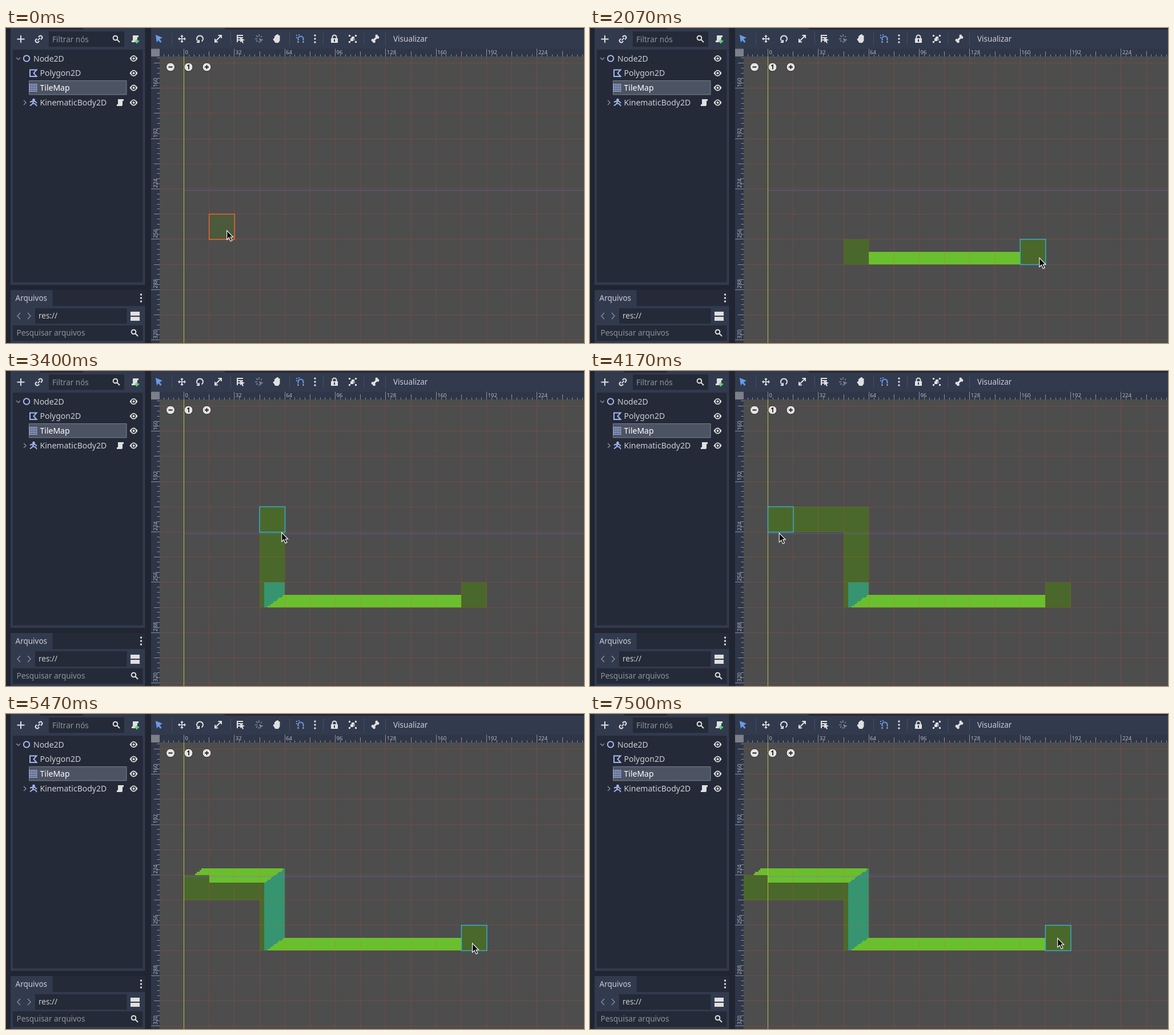
Animation, 1012 px wide and 553 px high, one loop 8 s. Source, as an HTML page:

```html
<!DOCTYPE html>
<html lang="pt">
<head>
<meta charset="utf-8">
<title>TileMap</title>
<style>
html, body { margin: 0; width: 100%; height: 100%; overflow: hidden; background: #202531; }
svg { display: block; width: 100%; height: 100%; }
text { font-family: "Noto Sans", sans-serif; font-size: 14px; fill: #cdcfd4; }
.small { font-size: 13.5px; }
.dim { fill: #8f949f; }
.rule { font-size: 9.5px; fill: #b4b8c0; }
.line { fill: none; stroke: #e0e0e0; stroke-width: 2; }
.node { fill: none; stroke: #a5b7f3; stroke-width: 2; }
.gray { fill: none; stroke: #858b98; stroke-width: 1.5; }
.snap { fill: none; stroke: #699ce8; stroke-width: 2; }
.field { fill: #242a37; }
.base { fill: #323a4e; }
.back { fill: #202531; }
.lit { fill: #e0e0e0; }
</style>
</head>
<body>
<svg viewBox="0 0 1012 553" xmlns="http://www.w3.org/2000/svg">
  <defs>
    <clipPath id="view"><path d="M269 50H1012V553H269Z"/></clipPath>
    <g id="eye">
      <path class="lit" d="M-7 0Q0-11 7 0Q0 11-7 0Z"/>
      <circle r="3.7" class="field"/><circle r="2" class="lit"/>
    </g>
    <g id="lens" class="line"><circle cx="-1.5" cy="-1.5" r="3.8"/><path d="M1.5 1.5L6 6"/></g>
    <path id="dots" class="line" d="M0-6v.1M0 0v.1M0 6v.1" stroke-linecap="round" style="stroke-width:3.4px"/>
    <path id="scroll" class="lit" d="M-4-6H6V-3H4V4Q4 6 2 6H-6V3H-4Z"/>
    <path id="arm" class="lit" d="M-1-2V-4H-3L0-7L3-4H1V-2Z"/>
    <g id="disc"><circle r="7.5" fill="#e4e4e4" stroke="#2a2a2a"/></g>
  </defs>

  <path fill="#4d4d4d" d="M269 50H1012V553H269Z"/>
  <g clip-path="url(#view)">
    <g id="tiles" shape-rendering="crispEdges"></g>
    <g id="grid" stroke="#ff4d1a" stroke-opacity=".2"></g>
    <path d="M311 285.5H1012" stroke="#66f" stroke-opacity=".45"/>
    <path d="M311.5 50V553" stroke="#b9bd40"/>
    <rect id="hover" fill-opacity=".5" stroke-opacity=".85" stroke-width="1.6"/>
  </g>

  <use href="#disc" x="288" y="68.5"/><use href="#disc" x="319.5" y="68.5"/><use href="#disc" x="351.5" y="68.5"/>
  <path d="M284.5 68.5h7M348 68.5h7M351.5 65v7M317.5 66.5L320 65v7.5" fill="none" stroke="#222" stroke-width="1.8"/>

  <!-- rulers -->
  <path fill="#2e3648" d="M254 36H1012V50H269V553H254Z"/>
  <path fill="#7c808a" d="M254 36h15v14h-15Z"/>
  <g id="ticks" stroke="#8d929d"></g>
  <g id="labels"></g>

  <!-- toolbar -->
  <path class="back" d="M0 0H254V553H0Z"/>
  <path class="base" d="M254 0H383V2.500H1012V36.500H254Z"/>
  <g id="separators" stroke="#454d61"></g>
  <path fill="#699ce8" d="M262 12l12 5l-5 2.500l3.500 4.500l-2.500 2l-3-4.500l-3 4Z"/>
  <g id="move" transform="translate(308 19)"><circle class="lit" r="1.7"/></g>
  <path class="line" d="M336.500 23.500a5.500 5.500 0 1 1 6 0M334 25h4v-4M339.500 19v.1"/>
  <path class="line" d="M367 23l9-9M366 19v5.500h5M371.500 13H377v5"/>
  <path class="line" d="M404 13h11M404 17h11M404 21h6M405 12v13"/>
  <path class="lit" d="M410 17l8 4l-3.500 1.500l1.500 4h-2l-1.500-3l-2.500 1.500Z"/>
  <path class="gray" d="M443 11v4M436 19h4M438 13l3 3M438 24l2.500-2.500M443 23v3M448 14l-2 2"/>
  <path fill="#858b98" d="M443 18l8 3l-4 1l-1 4Z"/>
  <path class="lit" d="M470 18v-4h2v-2h2.500v-1H477v2h2.500v9l-2.500 4h-5.500l-4-6q1-2.500 2.500-2Z"/>
  <path class="snap" d="M511.500 22v-3a4.500 4.500 0 0 1 9 0v3M508 13h2M508 17h2M512 12h2"/>
  <path class="line" d="M510.500 24.500h2M519.500 24.500h2"/>
  <use href="#dots" x="541" y="19"/>
  <path class="lit" d="M569 18h12v8h-12Z"/><path class="line" d="M571.500 19v-3a3.500 3.500 0 0 1 7 0v3"/>
  <path class="base" d="M574 20h2v4h-2Z"/>
  <path class="line" d="M600 13.500h14M600 24.500h14" stroke-dasharray="3 8" style="stroke-width:3px"/>
  <path class="lit" d="M605 15h5v3h-2v5h-5v-5h2Z"/><path fill="#9196a1" d="M608 18h3v4h-3Z"/>
  <path class="line" d="M643 22.500l7-7" style="stroke-width:3.5px"/>
  <path class="line" d="M642 21.500v.1M644.500 23.800v.1M648.800 14v.1M651 16.500v.1" stroke-linecap="round" style="stroke-width:4.8px"/>
  <text class="small" x="678" y="24">Visualizar</text>

  <!-- scene dock -->
  <path class="base" d="M8 0H60V2.500H135V0H243.500V451H8Z"/>
  <path class="line" d="M26 13v13M19.500 19.500h13"/>
  <path class="line" transform="translate(57.5 19.5) rotate(-45)" d="M-2-3h-2a3 3 0 0 0 0 6h2M2-3h2a3 3 0 0 1 0 6h-2M-3 0h6"/>
  <path class="field" d="M75 6h132v27h-132ZM12 38h227.500v408.500H12Z"/>
  <text class="small dim" x="81" y="24.5">Filtrar nós</text>
  <use href="#lens" x="193" y="19"/>
  <use href="#scroll" x="226" y="19"/>
  <path d="M229 19.500v7.500M225.500 23.300h7.500" stroke="#65d67c" stroke-width="2.5"/>
  <path d="M40.500 92.500h170.500v24.500h-170.500Z" fill="#4c5363" stroke="#7b818e"/>
  <path class="gray" d="M18 52l3.500 3.500l3.500-3.500M31 127l4 4l-4 4"/>
  <circle class="node" cx="36" cy="53.5" r="5.2"/>
  <path class="node" d="M53.500 73.500H42V85h11.500l-5-5.800Z"/>
  <g id="mesh" class="node" stroke-dasharray="2 1"></g>
  <circle cx="48.5" cy="126" r="2.3" fill="#a5b7f3"/>
  <path class="node" d="M42 130l4-1.500h4l4 3M48 129l-1.500 4l-4.500 3.500M47 132l4.500 1.500l2.500 3.500"/>
  <text x="48" y="58.5">Node2D</text>
  <text x="59.5" y="84">Polygon2D</text>
  <text x="59.5" y="110" style="fill:#fff">TileMap</text>
  <text x="59.5" y="135.5">KinematicBody2D</text>
  <use href="#scroll" x="200" y="131"/>
  <g id="eyes"></g>

  <!-- file dock -->
  <path class="field" d="M8 460h235.500v28H8Z"/>
  <path class="base" d="M8 460H81.500V488H243.500V553H8Z"/>
  <text class="small" x="16.5" y="479">Arquivos</text>
  <use href="#dots" x="236.5" y="474"/>
  <path class="gray" d="M25 500l-5 5.500l5 5.500M38 500l5 5.500l-5 5.500"/>
  <path class="field" d="M51 492h160.500v27H51ZM12 522h227.500v27H12Z"/>
  <text class="small" x="57" y="510">res://</text>
  <path class="lit" d="M218 498h16v7h-16ZM218 507h16v7h-16Z"/>
  <text class="small dim" x="18.5" y="540">Pesquisar arquivos</text>
  <use href="#lens" x="225" y="535"/>

  <path id="cursor" d="M.7.7V16.500L4.300 13L7.200 19.300L10 18L7.100 12H11.700Z" fill="#080808" stroke="#fff" stroke-width="1.1"/>
</svg>
<script>
const LOOP = 8000, CELL = 44.17, PX = CELL / 16;
const DARK = '#4a682b', BRIGHT = '#6abf2e', TEAL = '#369470';
const el = id => document.getElementById(id);
const X = c => 311.5 + c * CELL, Y = r => 282.5 + r * CELL;
const range = (from, to, make) => {
  let out = '';
  for (let i = from; i < to; i++) out += make(i);
  return out;
};

const poses = [{ t: 0, x: 386, y: 355, c: 1, r: 1 }];
const paintedAt = new Map();
let last = [386, 355, 1, 1];

function along(path, u) {
  const i = Math.max(1, path.findIndex(k => k[0] >= u));
  const a = path[i - 1], b = path[i];
  const p = (u - a[0]) / (b[0] - a[0]);
  return a.slice(1).map((v, n) => v + (b[n + 1] - v) * p);
}

// Keys are [progress, cursor x, cursor y, column, row]; a cell left out stays.
// Cells are painted up to the share given by paint.
function stroke(start, end, steps, paint, ...keys) {
  const path = [[0, ...last]];
  for (const [u, x, y, c = last[2], r = last[3]] of keys) {
    last = [x, y, c, r];
    path.push([u, ...last]);
  }
  for (let k = 1; k <= steps; k++) {
    const t = start + (end - start) * (k - 1) / Math.max(1, steps - 1);
    const [x, y, col, row] = along(path, k / steps);
    const c = Math.round(col), r = Math.round(row), id = c + ',' + r;
    poses.push({ t, x, y, c, r });
    if (k / steps <= paint && !paintedAt.has(id)) paintedAt.set(id, t);
  }
}

stroke(530, 1300, 12, 0, [.25, 376, 318, 1, 0], [.66, 424, 372, 3, 2], [1, 464, 402]);
stroke(1500, 1500, 1, 0, [1, 473, 398]);
stroke(1670, 2470, 17, 1, [.04, 473, 398], [.529, 786, 403, 10], [.64, 825, 401, 11], [.8, 820, 400], [1, 700, 395, 9]);
stroke(2500, 2870, 6, 0, [.5, 385, 390, 1], [1, 590, 392, 6]);
stroke(3070, 3200, 4, 1, [.5, 490, 385, 3], [.75, 478, 368, 3, 1], [1, 482, 350, 3, 0]);
stroke(3370, 3570, 4, 1, [.25, 482, 283, 3, -1], [1, 480, 264]);
stroke(3770, 4000, 6, 1, [.8, 345, 270, 0], [1, 332, 276]);
stroke(4170, 4670, 7, 1, [.4, 328, 298, 0, 0], [.6, 384, 303], [1, 328, 301]);
stroke(4830, 5570, 14, .3, [.14, 341, 300, 1], [.21, 375, 302, 2], [.3, 430, 303], [.8, 815, 400, 11, 2], [1, 818, 407]);
stroke(5970, 6270, 8, 0, [.5, 285, 301, -1, 0], [.62, 300, 299, 0], [1, 335, 302]);
stroke(6570, 6670, 3, 1, [.33, 300, 300, -1], [.66, 300, 290, -1, -1], [1, 298, 284]);
stroke(7000, 7500, 10, 0, [.8, 810, 392, 11, 2], [1, 818, 393]);

// Tile artwork is on a 16 by 16 pixel cell.
function tile(c, r, has) {
  const box = (x, y, w, h, color) =>
    `<rect x="${X(c) + x * PX}" y="${Y(r) + y * PX}" width="${w * PX}" height="${h * PX}" fill="${color}"/>`;
  const split = (y, x) => box(0, y, x, 1, BRIGHT) + box(x, y, 16 - x, 1, TEAL);
  const tail = (y, x) => box(x, y, 16 - x, 1, BRIGHT);
  const slope = n => Math.round(16 - 1.45 * (n + .5));
  const full = box(0, 0, 16, 16, DARK);
  const wall = box(0, 0, 3, 16, DARK) + box(3, 0, 13, 16, TEAL);

  if (r === 2 && c === 3) return has(3, 1) ? wall + range(8, 16, y => tail(y, slope(y - 8))) : full;
  if (r === 2) return has(c + 1, 2) ? box(0, 8, 16, 8, BRIGHT) : full;
  if (c === 3) {
    if (!has(2, 0)) return full;
    if (r === -1) return range(12, 16, y => split(y, slope(y - 12)));
    return r ? wall : wall + range(0, 5, y => split(y, slope(y + 4)));
  }
  const inner = has(c - 1, -1) && has(c - 1, 0) && has(c + 1, 0);
  if (r === 0) return inner ? full + box(0, 0, 16, 5, BRIGHT) : full;
  if (inner) return box(0, 12, 16, 4, BRIGHT);
  if (has(c, 0) && !has(c - 1, -1))
    return range(12, 16, y => tail(y, 11 - Math.round((y - 12) * 1.3)));
  return full;
}

function buildStatic() {
  const snap = v => Math.floor(v) + .5;
  const inset = i => i % 10 === 0 ? 0 : i % 5 === 0 ? 5 : 10.5;
  const label = (i, value, place) => i % 10 ? '' : `<text class="rule" transform="${place}">${value}</text>`;
  el('grid').innerHTML =
    range(0, 16, c => `<path d="M${snap(X(c))} 50V553"/>`) +
    range(-5, 7, r => `<path d="M269 ${snap(Y(r))}H1012"/>`);
  el('ticks').innerHTML =
    range(-4, 80, i => `<path d="M${snap(X(i / 5))} ${36 + inset(i)}V50"/>`) +
    range(-26, 31, i => `<path d="M${254 + inset(i)} ${snap(Y(i / 5))}H269"/>`);
  el('labels').innerHTML =
    range(0, 80, i => label(i, i * 3.2, `translate(${X(i / 5) + 2} 46)`)) +
    range(-26, 31, i => label(i, 224 + i * 3.2, `translate(264.5 ${Y(i / 5) - 2}) rotate(-90)`));
  el('separators').innerHTML = [290, 393, 496, 555, 626, 664].map(x => `<path d="M${x}.5 8V30"/>`).join('');
  el('move').innerHTML += range(0, 4, i => `<use href="#arm" transform="rotate(${i * 90})"/>`);
  el('mesh').innerHTML = range(0, 5, i => `<path d="M40.5 ${99 + i * 3}h14.5"/>`);
  el('eyes').innerHTML = range(0, 4, i => `<use href="#eye" x="223.5" y="${53.5 + i * 25.8}"/>`);
  const hover = el('hover');
  hover.setAttribute('width', CELL + .4);
  hover.setAttribute('height', CELL + .4);
  hover.setAttribute('fill', DARK);
}

let shown = null;
function draw(t) {
  const pose = poses.filter(p => p.t <= t).pop();
  if (pose === shown) return;
  shown = pose;
  const has = (c, r) => paintedAt.get(c + ',' + r) <= t;
  el('tiles').innerHTML = [...paintedAt.keys()].map(id => id.split(',').map(Number))
    .filter(([c, r]) => has(c, r)).map(([c, r]) => tile(c, r, has)).join('');
  const hover = el('hover');
  hover.setAttribute('x', X(pose.c));
  hover.setAttribute('y', Y(pose.r));
  hover.setAttribute('stroke', has(pose.c, pose.r) ? '#33b4dc' : '#ff6633');
  el('cursor').setAttribute('transform', `translate(${pose.x} ${pose.y})`);
}

buildStatic();
const began = performance.now();
function tick() {
  draw((performance.now() - began) % LOOP);
  requestAnimationFrame(tick);
}
tick();
</script>
</body>
</html>
```
